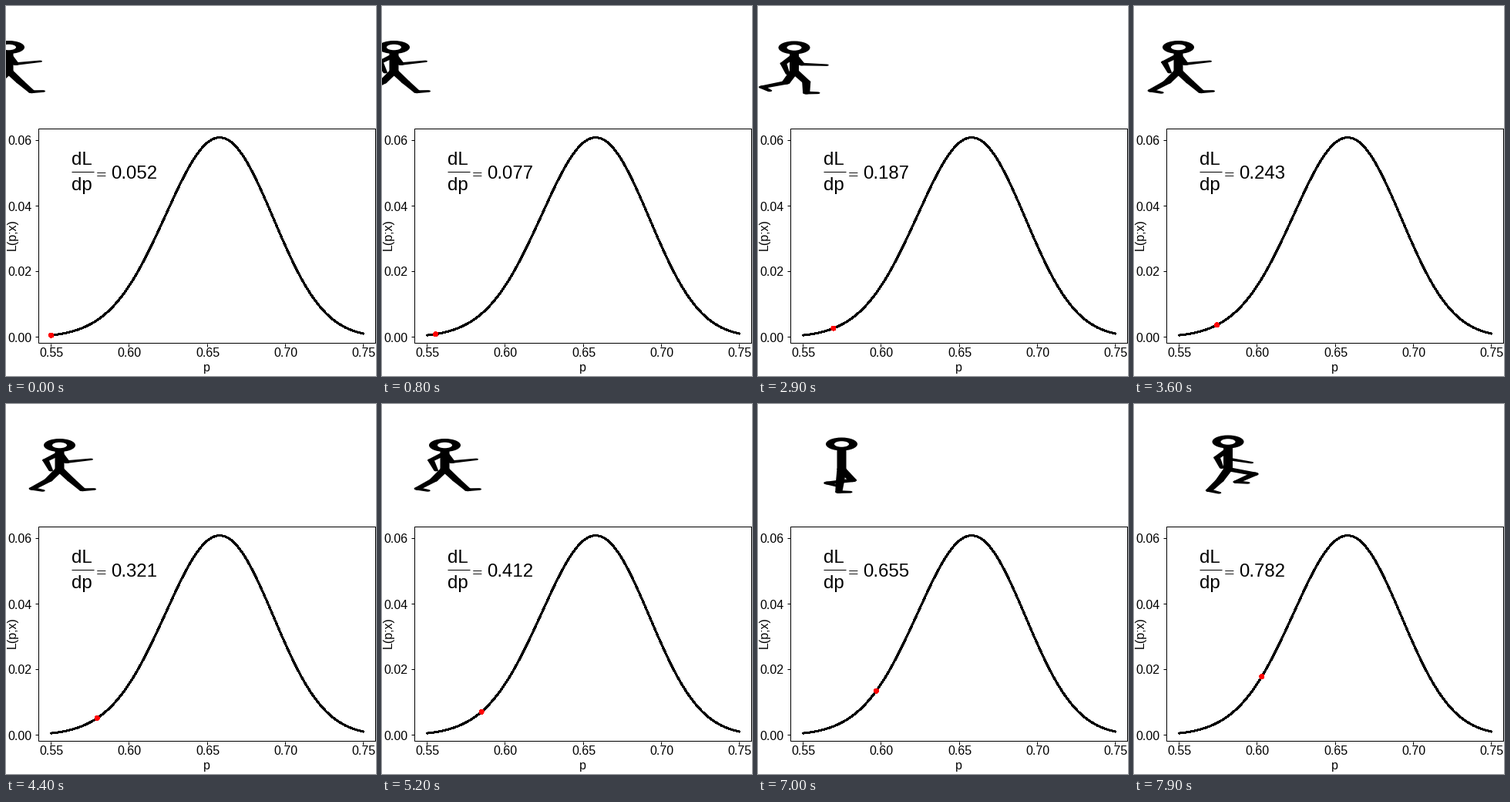
Write a matplotlib script that moves like this. It is 480 by 480 pixels and loops after 8 s.

```python
from math import comb

import matplotlib.pyplot as plt
import numpy as np
from matplotlib.animation import FuncAnimation
from matplotlib.patches import Ellipse, Polygon, Rectangle

SIZE, DPI = 480, 100
FRAMES, INTERVAL = 80, 100
PT = 72 / DPI  # points per pixel
N, X = 190, 125
P = np.linspace(0.55, 0.75, 300)

# Walker proportions; the figure is widened by STRETCH when drawn
STRETCH, HIP = 2.4, 84
LEG = (15.5, 14, 6), (2.5, 2.3, 1.9, 1.4)  # lengths, joint radii
ARM = (11.7, 13.5), (2.1, 1.8, 1.2)

# Head height, then joint angles in degrees (0 = down, 90 = forward):
# rear leg, front leg, rear arm, front arm
CYCLE = [
    (53.5, (-23, -38, 65), (24, 26, 97), (-40, 12), (19, 104)),
    (54, (-17, -65, 40), (25, 0, 88), (-30, 10), (20, 85)),
    (52, (22, -75, 55), (-3, -3, 88), (0, 0), (0, 0)),
    (49, (-17, -24, 60), (66, -43, 78), (-31, 11), (0, 69)),
]


def likelihood(p):
    return comb(N, X) * p**X * (1 - p) ** (N - X)


def slope(p):
    return likelihood(p) * (X / p - (N - X) / (1 - p))


def px(p):
    return 58.7 + (p - 0.55) * 2025


def py(v):
    return 429.8 - v * 4255


def arc(start, stop):
    t = np.linspace(start, stop, 12)
    return np.column_stack([np.cos(t), np.sin(t)])


def capsule(a, b, ra, rb):
    """Outline of a round-ended bar from a to b."""
    t = np.arctan2(b[1] - a[1], b[0] - a[0])
    return np.vstack([a + ra * arc(t + np.pi / 2, t + 3 * np.pi / 2),
                      b + rb * arc(t - np.pi / 2, t + np.pi / 2)])


def limb(start, angles, lengths, radii):
    joints = [np.array(start, float)]
    for angle, length in zip(np.radians(angles), lengths):
        joints.append(joints[-1] + length * np.array([np.sin(angle), np.cos(angle)]))
    return [capsule(*pair, *r) for pair, r in
            zip(zip(joints, joints[1:]), zip(radii, radii[1:]))]


def body(head_y, rear_leg, front_leg, rear_arm, front_arm):
    shapes = limb((0, head_y + 6), (0,), (HIP - head_y - 6,), (2.5, 2.5))
    for angles in (rear_leg, front_leg):
        shapes += limb((0, HIP), angles, *LEG)
    for angles in (rear_arm, front_arm):
        shapes += limb((0, head_y + 10), angles, *ARM)
    return [s * (STRETCH, 1) for s in shapes]


fig = plt.figure(figsize=(SIZE / DPI, SIZE / DPI), dpi=DPI, facecolor="white")
ax = fig.add_axes([0, 0, 1, 1])
ax.set(xlim=(0, SIZE), ylim=(SIZE, 0))
ax.axis("off")


def label(x, y, text, size=16, font="Liberation Sans", va="baseline", **kw):
    return ax.text(x, y, text, fontsize=size * PT, family=font, va=va, **kw)


def line(xs, ys):
    ax.plot(xs, ys, color="black", lw=PT, solid_capstyle="butt", snap=True)


def ellipse(w, h, color, zorder):
    return ax.add_patch(Ellipse((0, 0), w, h, fc=color, lw=0, zorder=zorder))


# Chart
ax.add_patch(Rectangle((42, 159), 437, 278, fill=False, ec="black", lw=PT, snap=True))
for v in np.arange(4) * 0.02:
    y = np.floor(py(v))
    line([38, 42], [y, y])
    label(33.5, y + 6.5, f"{v:.2f}", ha="right")
for p in 0.55 + np.arange(5) * 0.05:
    x = np.floor(px(p))
    line([x, x], [438, 442])
    label(x + 0.5, 455, f"{p:.2f}", ha="center")
label(260.5, 474, "p", ha="center")
label(8.5, 297, "L(p;x)", ha="center", va="center", rotation=90)
ax.plot(px(P), py(likelihood(P)), color="black", lw=2 * PT, antialiased=False,
        solid_capstyle="round")

# Derivative readout
label(85.5, 206, "dL", 24)
label(85.5, 239, "dp", 24)
line([85, 114], [215, 215])
label(117, 226, "=", 24, "Liberation Serif")
value = label(136.3, 224.5, "", 24)

dot = ellipse(6, 6, "red", 4)
dot.set_antialiased(False)

# Walker
poses = [body(*pose) for pose in CYCLE]
parts = [ax.add_patch(Polygon(s, fc="black", lw=0)) for s in poses[0]]
head = ellipse(41, 17, "black", 2)
hole = ellipse(19, 7.5, "white", 3)


def update(i):
    p = P[i]
    dot.center = px(p), py(likelihood(p))
    value.set_text(f"{slope(p):.3f}")

    cx, step = 3.5 + 1.5 * i, i % len(CYCLE)
    head.center = hole.center = cx, CYCLE[step][0]
    for part, shape in zip(parts, poses[step]):
        part.set_xy(shape + (cx, 0.5))
    return [dot, value, head, hole, *parts]


anim = FuncAnimation(fig, update, frames=FRAMES, interval=INTERVAL,
                     repeat=True, repeat_delay=0)
plt.show()
```
